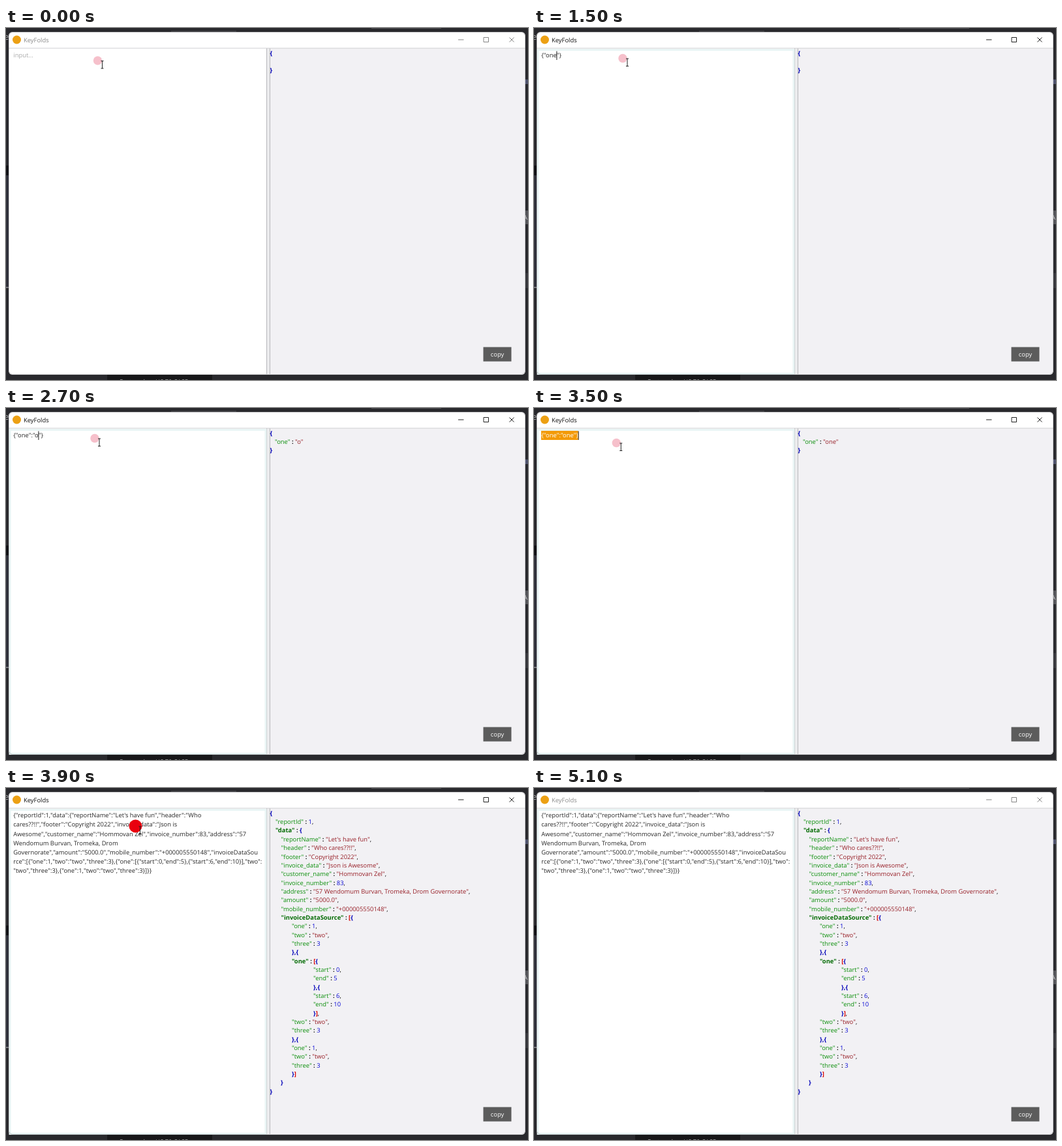
These frames come from a looping animation (800x540 px, 5200 ms). An HTML page:

```html
<!DOCTYPE html>
<html lang="en">
<head>
<meta charset="utf-8">
<style>
  html, body { margin: 0; width: 100%; height: 100%; overflow: hidden; background: #29292d; }
  svg { display: block; width: 100%; height: 100%; }
  text { font: 9.4px "Open Sans", "Noto Sans", sans-serif; white-space: pre; text-rendering: geometricPrecision; fill: #282828; }
  .key { fill: #0c8f0c; }
  .group { fill: #046c04; font-weight: 700; }
  .string { fill: #982028; }
  .number { fill: #0808d4; }
  .brace { fill: #0000b8; font-weight: 700; }
  .bracket { fill: #d80000; font-weight: 700; }
  .colon { fill: #151515; font-weight: 700; }
  .plain { fill: #151515; }
</style>
</head>
<body>
<svg viewBox="0 0 800 540">
  <!-- desktop behind the window -->
  <rect width="800" height="540" fill="#29292d"/>
  <rect y="226" width="5" height="172" fill="#30313a"/>
  <rect y="211" width="5" height="15" fill="#121216"/>
  <rect y="397" width="5" height="2" fill="#77777c"/>
  <rect x="253" y="4" width="100" height="2" fill="#3d3d41"/>
  <rect x="560" width="107" height="1" fill="#505054"/>
  <rect x="155" y="532" width="161" height="8" fill="#171719"/>
  <rect x="795" y="280" width="5" height="21" fill="#55555a"/>
  <rect x="795" y="376" width="5" height="23" fill="#38383d"/>
  <text x="-3" y="18" style="fill:#aaa;font-size:13px">e</text>
  <text x="795" y="86" style="fill:#9ba6e8">lli</text>
  <text x="793" y="294" style="fill:#ddd">A</text>
  <text x="174" y="546" style="fill:#bbb">Featured on US 70 CASE</text>

  <!-- window -->
  <rect x="4" y="6" width="792" height="526" rx="6" fill="#fff"/>
  <path d="M405 31H795.500V526Q795.500 531.500 790 531.500H405Z" fill="#f2f1f4"/>
  <rect x="399" y="31" width="6" height="500" fill="#ececee"/>
  <path d="M399.500 31V531M404.500 31V531" stroke="#b8b8bc"/>
  <path d="M4 31H796" stroke="#cfcfd2"/>
  <circle cx="16.500" cy="18" r="6.500" fill="#eca014"/>
  <text id="title" x="27" y="21.800">KeyFolds</text>
  <path id="buttons" d="M693 18H701.500M732 14.500H739.500V21.500H732ZM771.500 14.500L778.500 21.500M778.500 14.500L771.500 21.500" fill="none"/>
  <rect x="731.500" y="489.500" width="43" height="22" fill="#5c5c5c"/>
  <text x="753" y="503.700" text-anchor="middle" style="fill:#fff">copy</text>

  <!-- input pane -->
  <rect id="glow" x="6" y="33.500" width="392" height="497" fill="none" stroke="#e9f5f5" stroke-width="3"/>
  <rect x="4.500" y="6.500" width="791" height="525" rx="6" fill="none" stroke="#77777a" stroke-opacity=".4"/>
  <rect id="selection" x="11" y="35" height="14" fill="#f39a06"/>
  <g id="input"></g>
  <rect id="caret" y="35.500" width="1" height="13.500" fill="#222"/>

  <g id="output"></g>

  <g id="pointer">
    <circle id="spot"/>
    <path d="M5 .5H9M7 .5V12M5 12H9" fill="none" stroke="#222"/>
  </g>
</svg>
<script>
const $ = id => document.getElementById(id);
const LOOP = 5200, TICK = 100;
const FOCUS = 300, SELECT = 3400, PASTE = 3700, BLUR = 5100;

// [time, text, caret index]
const typing = [
  [300, '', 0], [700, '{}', 1], [900, '{"}', 2], [1000, '{""}', 3], [1100, '{""}', 2],
  [1300, '{"o"}', 3], [1400, '{"on"}', 4], [1500, '{"one"}', 5], [1800, '{"one"}', 6],
  [2000, '{"one":}', 7], [2200, '{"one":"}', 8], [2300, '{"one":""}', 9],
  [2400, '{"one":""}', 8], [2700, '{"one":"o"}', 9], [2800, '{"one":"on"}', 10],
  [2900, '{"one":"one"}', 11], [3400, '{"one":"one"}', 13]
];

const pasted = [
  '{"reportId":1,"data":{"reportName":"Let\'s have fun","header":"Who',
  'cares??!!","footer":"Copyright 2022","invoice_data":"Json is',
  'Awesome","customer_name":"Hommovan Zel","invoice_number":83,"address":"57',
  'Wendomum Burvan, Tromeka, Drom',
  'Governorate","amount":"5000.0","mobile_number":"+000005550148","invoiceDataSou',
  'rce":[{"one":1,"two":"two","three":3},{"one":[{"start":0,"end":5},{"start":6,"end":10}],"two":',
  '"two","three":3},{"one":1,"two":"two","three":3}]}}'
];

// [x, lines] blocks of the formatted result
const formatted = [
  [404.5, ['{']],
  [413, ['"reportId" : 1,', '"data" : {']],
  [421.5, ['"reportName" : "Let\'s have fun",', '"header" : "Who cares??!!",',
    '"footer" : "Copyright 2022",', '"invoice_data" : "Json is Awesome",',
    '"customer_name" : "Hommovan Zel",', '"invoice_number" : 83,',
    '"address" : "57 Wendomum Burvan, Tromeka, Drom Governorate",',
    '"amount" : "5000.0",', '"mobile_number" : "+000005550148",', '"invoiceDataSource" : [{']],
  [438, ['"one" : 1,', '"two" : "two",', '"three" : 3', '},{', '"one" : [{']],
  [471, ['"start" : 0,', '"end" : 5', '},{', '"start" : 6,', '"end" : 10', '}],']],
  [438, ['"two" : "two",', '"three" : 3', '},{', '"one" : 1,', '"two" : "two",', '"three" : 3', '}]']],
  [421, ['}']],
  [404.5, ['}']]
];

// [time, x, y] of the highlight spot
const path = [
  [0, 140.5, 50], [300, 136, 46.5], [3100, 136, 46.5], [3400, 126.3, 53.5], [3500, 126.3, 53.5],
  [3800, 126.3, 48.5], [3900, 198.5, 58.5], [4000, 198.5, 58.5], [4400, 200.3, 52], [LOOP, 200.3, 52]
];
const presses = [[300, 500], [3900, 4100]];

const line = (x, y, content) => `<text x="${x}" y="${y}">${content}</text>`;
const span = (kind, s) => `<tspan class="${kind}">${s}</tspan>`;

function colour(row) {
  const keyKind = /\{$/.test(row) ? 'group' : 'key';
  return row.replace(/("[^"]*")(?= :)|("[^"]*")|(\d+)|(\},\{|[{}])|([[\]])|( : )|,/g,
    (s, key, string, number, brace, bracket, colon) => span(
      key ? keyKind : string ? 'string' : number ? 'number' : brace ? 'brace'
        : bracket ? 'bracket' : colon ? 'colon' : 'plain', s));
}

function rows(blocks) {
  let n = 0;
  return blocks.flatMap(([x, lines]) =>
    lines.map(s => line(x, 41.8 + 13.34 * n++, colour(s)))).join('');
}

function outputAt(t, text) {
  if (t >= PASTE) return rows(formatted);
  const value = /:("\w*")\}/.exec(text);
  return rows([[404.5, ['{']], [412, [value ? `"one" : ${value[1]}` : '']], [404.5, ['}']]]);
}

function pointAt(t) {
  const i = path.findIndex(p => p[0] > t);
  const [t0, x0, y0] = path[i - 1], [t1, x1, y1] = path[i];
  const k = (t - t0) / (t1 - t0);
  return [x0 + (x1 - x0) * k, y0 + (y1 - y0) * k];
}

function set(id, attributes) {
  for (const name in attributes) $(id).setAttribute(name, attributes[name]);
}
const show = (id, on) => set(id, { visibility: on ? 'visible' : 'hidden' });

function draw(t) {
  const active = t >= FOCUS && t < BLUR;
  $('title').style.fill = active ? '#111' : '#8b8b8b';
  set('buttons', { stroke: active ? '#222' : '#858585' });
  show('glow', t >= FOCUS);

  const [, text, caret] = typing.filter(k => k[0] <= t).pop() || [0, '', 0];
  const selected = t >= SELECT && t < PASTE;
  $('input').innerHTML = t >= PASTE ? pasted.map((s, i) => line(11.3, 45.1 + 14.2 * i, s)).join('')
    : line(11.3, 45.1, t < FOCUS ? 'input...' : text);
  const first = $('input').firstChild;
  if (t < FOCUS) first.style.fill = '#aaa';
  if (selected) first.style.fill = '#fff';

  const caretX = 11 + (t < PASTE && caret ? first.getSubStringLength(0, caret) : 0);
  set('caret', { x: caretX });
  set('selection', { width: caretX - 11 });
  show('caret', active && t < PASTE);
  show('selection', selected);
  $('output').innerHTML = outputAt(t, text);

  const [x, y] = pointAt(t);
  const pressed = presses.some(([from, to]) => t >= from && t < to);
  set('pointer', { transform: `translate(${x} ${y})` });
  set('spot', { r: pressed ? 10 : 6.7, fill: pressed ? '#e9000f' : 'rgba(222,24,62,.27)' });
  show('pointer', t < BLUR);
}

let last = -1;
const start = performance.now();
function frame() {
  const t = Math.floor((performance.now() - start) % LOOP / TICK) * TICK;
  if (t !== last) draw(last = t);
  requestAnimationFrame(frame);
}
frame();
</script>
</body>
</html>
```
